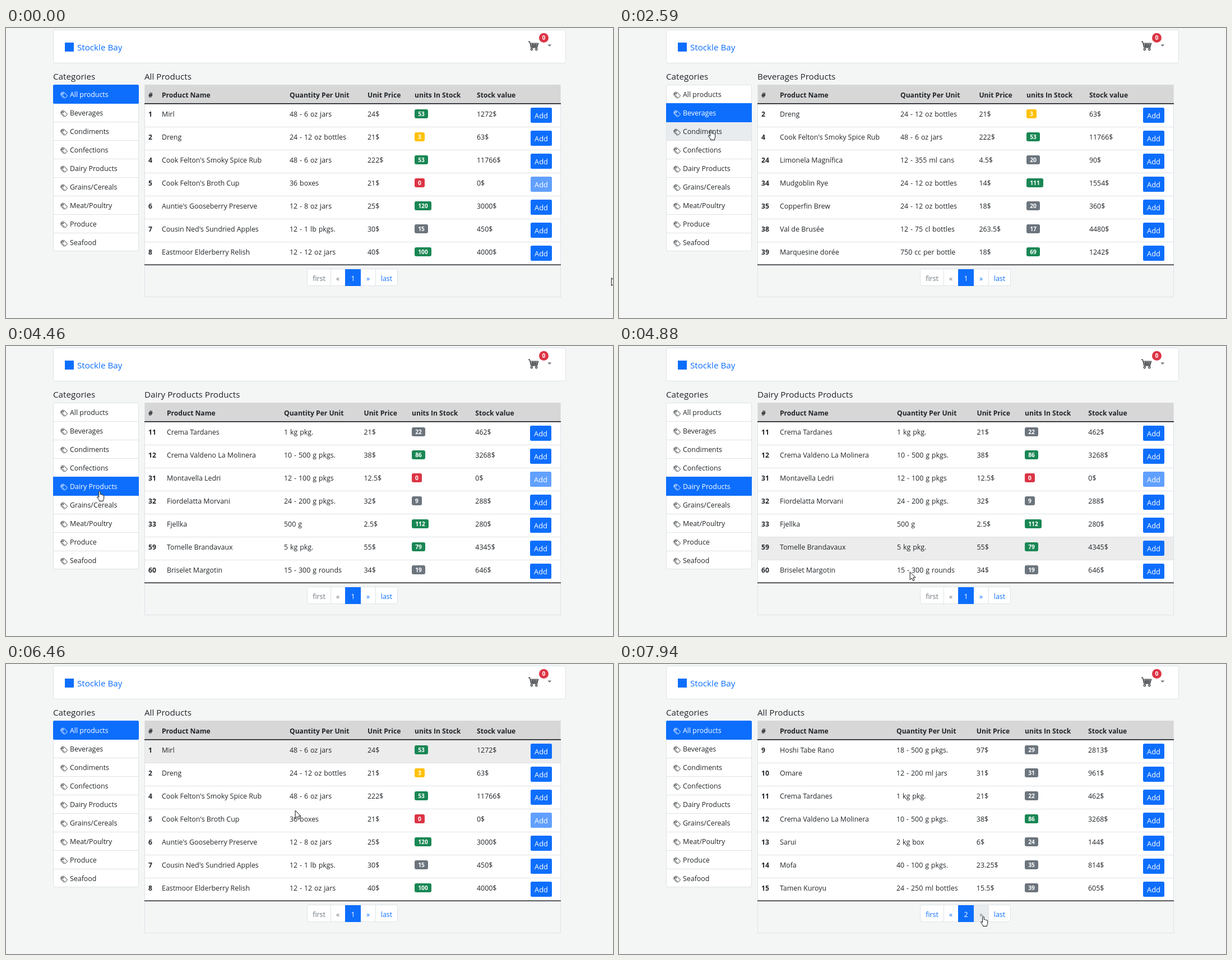
Recreate the animation shown at these times as an HTML page. Size 1083 by 517 pixels, loop 8 s.

```html
<!DOCTYPE html>
<html lang="en">
<head>
<meta charset="utf-8">
<style>
html, body { margin: 0; width: 100%; height: 100%; overflow: hidden; background: #f4f6f6; }
svg { display: block; font: 12.4px "Open Sans", "Noto Sans", sans-serif; white-space: pre; }
.bold { font-weight: 700; font-size: 12.1px; }
.title { font-size: 15.2px; }
.badge { font-weight: 700; font-size: 10.2px; text-anchor: middle; }
.button { font-size: 12.9px; text-anchor: middle; }
.mid { text-anchor: middle; }
.airy { word-spacing: .7px; }
</style>
</head>
<body>
<svg id="stage" width="1083" height="517" viewBox="0 0 1083 517"></svg>
<script>
const LOOP = 8000, STEP = 70, LAG = 100, PRESS = 270;
const BLUE = '#0d6efd', INK = '#212529', LINE = '#dee2e6', GREY = '#6c757d',
      RED = '#dc3545', GREEN = '#198754', YELLOW = '#ffc107';
const categories = ['All products', 'Beverages', 'Condiments', 'Confections', 'Dairy Products',
  'Grains/Cereals', 'Meat/Poultry', 'Produce', 'Seafood'];
const heads = ['Product Name', 'Quantity Per Unit', 'Unit Price', 'units In Stock', 'Stock value'];

// id | name | quantity | price | units | category
const products = `1|Mirl|48 - 6 oz jars|24|53
2|Dreng|24 - 12 oz bottles|21|3|1
4|Cook Felton's Smoky Spice Rub|48 - 6 oz jars|222|53|1
5|Cook Felton's Broth Cup|36 boxes|21|0
6|Auntie's Gooseberry Preserve|12 - 8 oz jars|25|120
7|Cousin Ned's Sundried Apples|12 - 1 lb pkgs.|30|15
8|Eastmoor Elderberry Relish|12 - 12 oz jars|40|100
9|Hoshi Tabe Rano|18 - 500 g pkgs.|97|29
10|Omare|12 - 200 ml jars|31|31
11|Crema Tardanes|1 kg pkg.|21|22|4
12|Crema Valdeno La Molinera|10 - 500 g pkgs.|38|86|4
13|Sarui|2 kg box|6|24
14|Mofa|40 - 100 g pkgs.|23.25|35
15|Tamen Kuroyu|24 - 250 ml bottles|15.5|39
24|Limonela Magnífica|12 - 355 ml cans|4.5|20|1
31|Montavella Ledri|12 - 100 g pkgs|12.5|0|4
32|Fiordelatta Morvani|24 - 200 g pkgs.|32|9|4
33|Fjellka|500 g|2.5|112|4
34|Mudgoblin Rye|24 - 12 oz bottles|14|111|1
35|Copperfin Brew|24 - 12 oz bottles|18|20|1
38|Val de Brusée|12 - 75 cl bottles|263.5|17|1
39|Marquesine dorée|750 cc per bottle|18|69|1
59|Tomelle Brandavaux|5 kg pkg.|55|79|4
60|Briselet Margotin|15 - 300 g rounds|34|19|4`.split('\n').map(row => row.split('|'));

const rand = n => { const s = Math.sin(n * 127.1) * 43758.5; return s - Math.floor(s); };
const pick = (list, n) => list[Math.floor(rand(n) * list.length)];

// Stock for the categories that are only passed through
function invent(seed, kinds) {
  return Array.from({ length: 7 }, (_, i) => {
    const n = seed + i * 9;
    const name = pick(['Velmo', 'Tarri', 'Osku', 'Brindo'], n) + pick(['ra ', 'sk ', 'lette '], n + 1) + pick(kinds, n + 2);
    return [15 + i * 7, name, `24 - ${pick([8, 12, 500], n + 3)} g jars`, 10 + Math.floor(rand(n + 4) * 30),
      String(Math.floor(rand(n + 5) * 120))];
  });
}

const stock = item => products.filter(p => p[5] == item);
const view = (item, shift, rows, page = 1) => ({ item, shift, rows, page });
const all = view(0, 0, products.slice(0, 7));
const views = [all, view(1, 4, stock(1)), view(2, 4, invent(3, ['Syrup', 'Relish', 'Paste'])),
  view(3, 4, invent(80, ['Wafers', 'Drops', 'Biscuits'])), view(4, 10, stock(4)),
  all, view(0, 11, products.slice(7, 14), 2)];

// Each switch shows the next view; the mouse is pressed just before it.
const switches = [1860, 2790, 3730, 4340, 6030, 7250, LOOP];

// Pointer trips: start, end, target x, y, ease-out powers for x and y
const trips = [[70, 1300, 160, 150, 2, 3], [1860, 2130, 164, 181, 2, 2], [2790, 3070, 166, 223, 2, 2],
  [3730, 4200, 167, 258, 2, 2], [4480, 5100, 640, 452, 1.5, 1.5], [5150, 5900, 152, 113, 2.63, 1.74],
  [6300, 6800, 650, 449, 3.4, 1.5]];

function pointer(t) {
  let x = 1080, y = 445;
  for (const [start, end, tx, ty, px, py] of trips) {
    const left = 1 - Math.min(1, Math.max(0, (t - start) / (end - start)));
    x = tx + (x - tx) * left ** px;
    y = ty + (y - ty) * left ** py;
    if (left > 0) break;
  }
  return [x, y];
}

const rect = (x, y, w, h, fill, more = '') => `<rect x="${x}" y="${y}" width="${w}" height="${h}" fill="${fill}" ${more}/>`;
const text = (x, y, s, fill = INK, cls = '') => `<text x="${x}" y="${y}" fill="${fill}" class="${cls}">${s}</text>`;
const line = (d, color = LINE, width = 1) => `<path d="${d}" fill="none" stroke="${color}" stroke-width="${width}"/>`;
const panel = (x, y, w, h) => rect(x, y, w, h, '#fff', `stroke="${LINE}" rx="2.5"`);

function tag(x, y, color) {
  return `<g transform="translate(${x} ${y}) scale(.81)" fill="none" stroke="${color}" stroke-width="1.15">
    <path d="M2.6 1.5h5l7.3 7.4-5 5.2-7.3-7.3zM.6 3v4.6l7.2 7.3"/><circle cx="5.5" cy="4.5" r="1.1"/></g>`;
}

function header() {
  return panel(84.5, 3.5, 914, 59) + rect(105, 26, 16, 16, BLUE) + text(127, 40, 'Stockle Bay', BLUE, 'title') +
    `<g transform="translate(932 22) scale(1.17)" fill="none" stroke="${INK}">
      <path d="M0 2h2l2.2 9h9l1.8-6.5H2.6M3.2 6.7h11M3.7 8.9h10M6 4.5l.6 6.4M8.7 4.5v6.4M11.6 4.5l-.6 6.4"/>
      <circle cx="5" cy="13.6" r="1.4"/><circle cx="12.2" cy="13.6" r="1.4"/></g>` +
    `<circle cx="959.5" cy="17.5" r="8.5" fill="${RED}"/>` + text(959.5, 21.3, 0, '#fff', 'badge') +
    `<path d="M966.3 29.5h7l-3.5 3.6z" fill="${GREY}"/>`;
}

function sidebar(active, hover, pressed) {
  let out = text(84, 92, 'Categories', INK, 'title') + panel(84.5, 101.5, 152, 296);
  categories.forEach((name, i) => {
    const y = 101 + 33 * i, on = i === active, over = i === hover && !on;
    if (over) out += rect(85, y + 1, 151, 32, pressed ? '#e9ecef' : '#f8f9fa');
    if (i < 8) out += line(`M85 ${y + 33.5}h151`);
    if (on) out += rect(84, y, 153, 34, BLUE, i ? '' : 'rx="2.5"');
    const color = on ? '#fff' : over && !pressed ? '#495057' : INK;
    out += tag(97.5, y + 12.5, color) + text(114, y + 22.3, name, color);
  });
  return out;
}

function table({ item, shift, rows }, hover) {
  const title = item ? categories[item] + ' Products' : 'All Products';
  const nameX = rows[6][0] > 9 ? 287 : 278;
  const [quantityX, priceX, unitsX, valueX, buttonX] =
    [506 - shift, 645 - .65 * shift, Math.round(729 - .5 * shift), 840 - .27 * shift, Math.round(936 - .13 * shift)];
  let out = text(247, 92, title, INK, 'title') + rect(247, 101, 743, 34, '#d7d7d7') +
    rect(247, 135, 743, 287, '#fff') + text(254, 123.5, '#', INK, 'bold');
  [nameX, quantityX, priceX, unitsX, valueX].forEach((x, i) => out += text(x, 123.5, heads[i], INK, 'bold'));
  rows.forEach(([id, name, quantity, price, units], i) => {
    const y = 136 + 41 * i, base = y + 21.6, n = +units, w = 12 + 6 * units.length;
    const color = n === 0 ? RED : n < 5 ? YELLOW : n < 50 ? GREY : GREEN;
    if (i === hover) out += rect(247, y, 743, 40, '#ececec');
    if (i < 6) out += line(`M247 ${y + 40.5}h743`);
    out += text(254, base, id, INK, 'bold') + text(nameX, base, name) + text(quantityX, base, quantity, INK, 'airy') +
      text(priceX, base, price + '$') + text(valueX, base, Math.round(price * n) + '$') +
      rect(unitsX, y + 9, w, 16, color, 'rx="3"') + text(unitsX + w / 2, y + 21, units, '#fff', 'badge') +
      rect(buttonX, y + 6, 38, 27, BLUE, `rx="2.5" opacity="${n ? 1 : .65}"`) +
      text(buttonX + 19, y + 25, 'Add', '#fff', 'button');
  });
  return out + line('M247.5 101V480M989.5 101V480M247 479.5h743') + line('M247 134.9h743M247 422.2h743', INK, 1.6);
}

function pager(page, hover, pressed) {
  const back = page > 1 ? BLUE : GREY;
  const cells = [[558.5, 'first', back], [592, '«', back], [619, page, '#fff'],
    [646, '»', hover && pressed ? GREY : BLUE], [679, 'last', BLUE]];
  return panel(537.5, 429.5, 161, 30) + (hover ? rect(633, 430, 26, 29, '#e9ecef') : '') +
    line('M579.5 430v29M659.5 430v29') + rect(605, 430, 28, 30, BLUE) +
    cells.map(([x, s, color]) => text(x, 450.6, s, color, 'mid')).join('');
}

function cursor([x, y], hand) {
  const d = hand
    ? 'M-1.4 1.6q1.3-1.9 2.6 0v5q1.7-.8 2.3.6q1.6-.6 2.2.7q1.9-.4 2 1.4v4q-.2 2-1.3 3.4v1.8h-7v-1.6l-3.6-4.8q-.6-1.9 1-1.8l1.8 1.6z'
    : 'M.3.5v14l3.2-3 2.2 4.8 2.4-1-2.1-4.8h4.2z';
  return `<path transform="translate(${x.toFixed(1)} ${y.toFixed(1)})" d="${d}" fill="#fff" stroke="#111" stroke-linejoin="round"/>`;
}

function hit([x, y]) {
  const inside = (x0, y0, x1, y1) => x > x0 && x < x1 && y >= y0 && y < y1;
  return {
    item: inside(84, 101, 237, 398) ? Math.floor((y - 101) / 33) : -1,
    row: inside(247, 136, 990, 422) ? Math.floor((y - 136) / 41) : -1,
    next: inside(633, 430, 660, 460)
  };
}

const stage = document.getElementById('stage');
let last = '';

function draw(now) {
  const t = now % LOOP, tick = Math.floor((t - 20) / STEP) * STEP + 20;
  const v = views[switches.filter(s => s <= t).length];
  const pressed = switches.some(s => t >= s - PRESS && t < s);
  const over = hit(pointer(tick - LAG)); // hover trails the pointer
  const html = header() + sidebar(v.item, over.item, pressed) + table(v, over.row) +
    pager(v.page, over.next, pressed) + cursor(pointer(tick), over.item >= 0 || over.next);
  if (html !== last) stage.innerHTML = last = html;
}

const start = performance.now();
function loop() {
  draw(performance.now() - start);
  requestAnimationFrame(loop);
}
loop();
</script>
</body>
</html>
```
